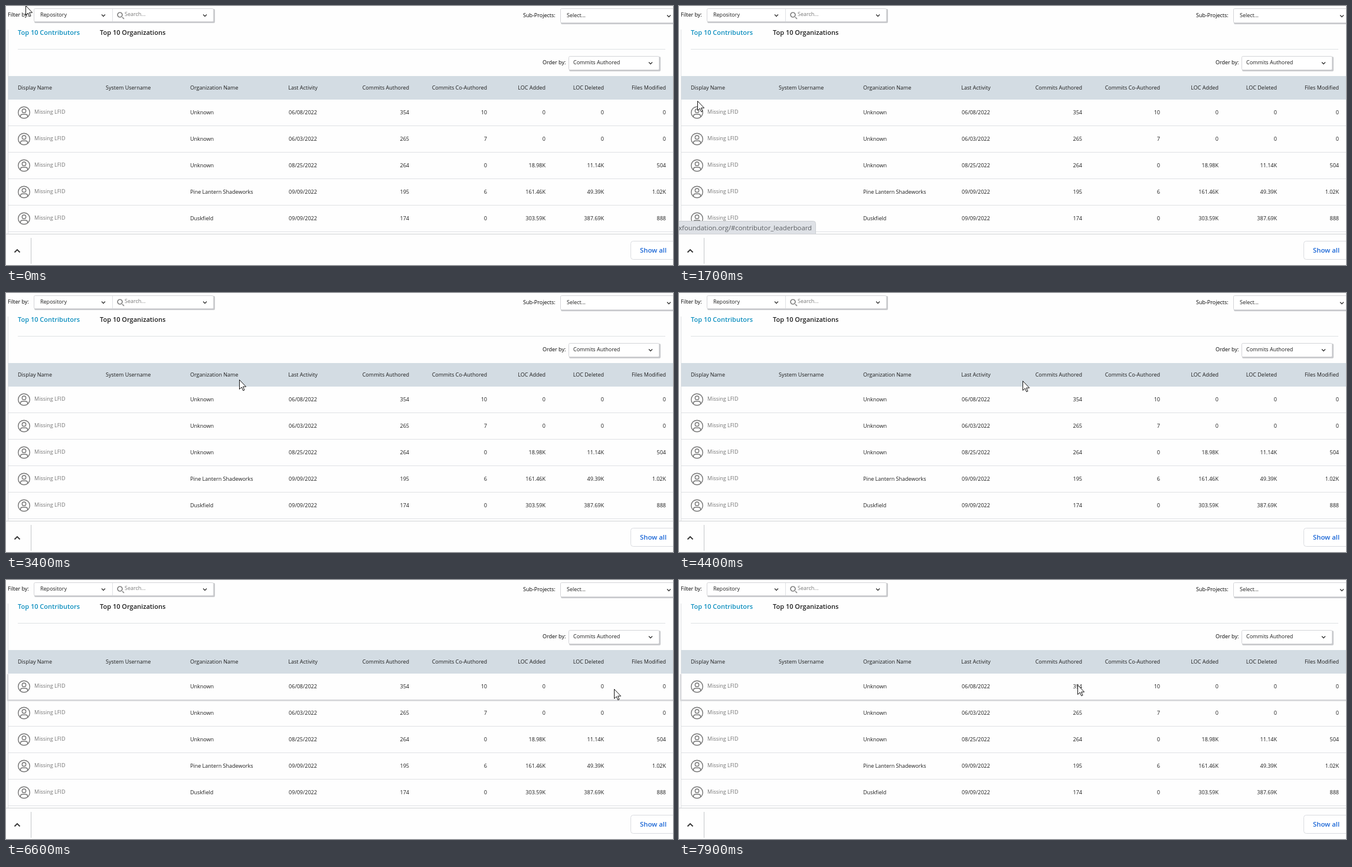
Recreate the animation shown at these times as an HTML page. Size 1130 px wide and 440 px high, loop 8 s.

```html
<!DOCTYPE html>
<html lang="en">
<head>
<meta charset="utf-8">
<title>Contributor leaderboard</title>
<style>
  html, body { margin: 0; width: 100%; height: 100%; overflow: hidden; background: #fefefe; }
  svg { display: block; font: 9px "Open Sans", "Noto Sans", sans-serif; fill: #1c1c1c; }
  text { white-space: pre; }
  .line { fill: none; stroke: #dfe1e4; }
  .chevron { fill: none; stroke: #333; stroke-width: 1.3; }
  .avatar { fill: none; stroke: #757575; stroke-width: 1.4; }
  .tab { font-size: 11px; font-weight: 600; }
  .pointer { fill: #fff; stroke: #111; }
</style>
</head>
<body>
<svg id="stage" width="1130" height="440" viewBox="0 0 1130 440"></svg>
<script>
const stage = document.getElementById('stage');

function add(tag, attrs, parent = stage) {
  const el = document.createElementNS('http://www.w3.org/2000/svg', tag);
  for (const key in attrs) el.setAttribute(key, attrs[key]);
  return parent.appendChild(el);
}

function label(str, x, y, attrs = {}, parent = stage) {
  const el = add('text', { x, y, ...attrs }, parent);
  el.textContent = str;
  return el;
}

const path = (d, cls, attrs = {}, parent = stage) => add('path', { d, class: cls, ...attrs }, parent);
const chevron = (x, y) => path(`M${x - 3} ${y - 1.5}l3 3 3-3`, 'chevron');

function box(x, y, w, h) {
  add('rect', { x: x + 1, y: y + 1, width: w + 1, height: h + 1, rx: 2, fill: '#c9cacd' });
  add('rect', { x: x + .5, y: y + .5, width: w - 1, height: h - 1, rx: 2, fill: '#fff', stroke: '#d3d4d7' });
}

// Filters
label('Filter by:', 3, 18, { fill: '#000' });
box(47, 4, 305, 23);
path('M180.5 5V26', 'line', { stroke: '#d3d4d7' });
label('Repository', 58, 18);
chevron(165, 16);
path('M197 19l3 3M193 11a4 4 0 1 0 .01 0', 'line', { style: 'stroke:#858585;stroke-width:1.7' });
label('Search...', 201, 17, { fill: '#777' });
chevron(337, 16);
label('Sub-Projects:', 876, 19, { fill: '#000' });
box(939, 4, 200, 25);
label('Select...', 950, 19);
chevron(1123, 17);

// Tabs and ordering
label('Top 10 Contributors', 20, 49, { class: 'tab', fill: '#0d8fbf' });
label('Top 10 Organizations', 159, 49, { class: 'tab' });
path('M20 73.5H1117M3.5 40V387', 'line');
label('Order by:', 909, 99, { fill: '#000' });
box(953, 85, 154, 24);
label('Commits Authored', 961, 99);
chevron(1092, 97);

// Table
add('rect', { x: 4, y: 119, width: 1126, height: 40, fill: '#d3dce3' });
const columns = [
  ['Display Name', 20, 'start'], ['System Username', 169, 'start'],
  ['Organization Name', 312, 'start'], ['Last Activity', 503, 'middle'],
  ['Commits Authored', 683, 'end'], ['Commits Co-Authored', 815, 'end'],
  ['LOC Added', 914, 'end'], ['LOC Deleted', 1013, 'end'], ['Files Modified', 1118, 'end']
];
const headers = columns.map(([name, x, anchor]) => label(name, x, 142, { 'text-anchor': anchor }));

const rows = [
  ['Unknown', '06/08/2022', '354', '10', '0', '0', '0'],
  ['Unknown', '06/03/2022', '265', '7', '0', '0', '0'],
  ['Unknown', '08/25/2022', '264', '0', '18.98K', '11.14K', '504'],
  ['Pine Lantern Shadeworks', '09/09/2022', '195', '6', '161.46K', '49.39K', '1.02K'],
  ['Duskfield', '09/09/2022', '174', '0', '303.59K', '387.69K', '888']
];
rows.forEach((cells, i) => {
  const y = 181 + i * 45;
  add('circle', { cx: 30.5, cy: y, r: 9.8, class: 'avatar' });
  add('circle', { cx: 30.5, cy: y - 2.8, r: 3.2, class: 'avatar' });
  path(`M24.5 ${y + 7.5}v-1q0-3.5 3.5-3.5h5q3.5 0 3.5 3.5v1`, 'avatar');
  label('Missing LFID', 48, y + 2, { fill: '#747474' });
  cells.forEach((value, c) => {
    const [, x, anchor] = columns[c + 2];
    label(value, x, y + 3, { 'text-anchor': anchor });
  });
  path(`M4 ${y + 22.5}H1130`, 'line');
});
const hover = path('M3 160V204.5H1130', 'line', { style: 'stroke:#d5d6d9;stroke-width:2.4' });

// Link address bubble
const bubble = add('g', {});
path('M-1 365.5H227.5q4 0 4 4V387.5H-1Z', '', { fill: '#dee1e6', stroke: '#cdd0d4' }, bubble);
label('xfoundation.org/#contributor_leaderboard', 225, 381,
  { 'text-anchor': 'end', 'font-size': 11.3, fill: '#5c6064' }, bubble);

// Bottom bar
path('M0 387.5H1130', 'line', { style: 'stroke:#d0d2d5' });
path('M42.5 394V438', 'line', { style: 'stroke:#c4c6c9' });
path('M14.5 418.5l4.5-4.5 4.5 4.5', 'chevron', { style: 'stroke-width:1.8' });
add('rect', { x: 1058.5, y: 399.5, width: 90, height: 31, rx: 4, fill: '#fff', stroke: '#dadce0' });
label('Show all', 1074, 419, { 'font-size': 11.3, 'font-weight': 600, fill: '#1a66d6' });

// Pointers, each with its hot spot at 0,0
const pointers = {
  arrow: path('M.5 .5V16.5L4.2 13 6.7 18.8 9 17.8 6.5 12.2H11.6Z', 'pointer'),
  beam: path('M-3 -6.5h2.2l.8 .8 .8-.8H3M0-6V6M-3 6.5h2.2l.8-.8 .8 .8H3', 'line', { style: 'stroke:#fff' }),
  hand: path('M-1.5 9V1q0-1.5 1.5-1.5T1.5 1V7q3-1 3 1 3-1 3 1 3-1 3 1v4l-2 5H.5l-5-7q-1-2 1-2Z', 'pointer')
};

// Pointer route: time, x, y
const route = [
  [0, 33, -1], [500, 62, 42], [1000, 80, 46], [1300, 82, 46], [1400, 82, 46],
  [1700, 31, 161], [1900, 42, 170], [2100, 72, 166], [2400, 128, 141], [2500, 128, 141],
  [3400, 395, 147], [3600, 395, 147], [4400, 582, 149], [4500, 610, 148], [4600, 610, 148],
  [5500, 870, 144], [5600, 870, 144], [5900, 950, 122], [6200, 1085, 138], [6300, 1085, 138],
  [6500, 1060, 180], [6700, 1000, 190], [6800, 1000, 190], [7200, 615, 141],
  [7600, 650, 165], [7900, 675, 178], [8000, 675, 178]
];

function locate(t) {
  const next = route.findIndex(stop => stop[0] > t);
  const [t0, x0, y0] = route[next - 1], [t1, x1, y1] = route[next];
  const k = (t - t0) / (t1 - t0);
  return [Math.round(x0 + (x1 - x0) * k), Math.round(y0 + (y1 - y0) * k)];
}

function overText(x, y) {
  return headers.some(el => {
    const b = el.getBBox();
    return x >= b.x && x <= b.x + b.width && y >= b.y && y <= b.y + b.height;
  });
}

function draw(now) {
  const t = Math.floor(now % 8000 / 100) * 100;
  const [x, y] = locate(t);
  const onTab = x >= 20 && x <= 126 && y >= 38 && y <= 54;
  const kind = onTab ? 'hand' : overText(x, y) ? 'beam' : 'arrow';
  for (const name in pointers) {
    pointers[name].setAttribute('visibility', name === kind ? 'visible' : 'hidden');
  }
  pointers[kind].setAttribute('transform', `translate(${x} ${y})`);
  hover.setAttribute('visibility', y > 162 && y < 204 ? 'visible' : 'hidden');
  bubble.setAttribute('opacity', t < 500 ? 0 : Math.max(0, Math.min(1, (2200 - t) / 400)));
  requestAnimationFrame(draw);
}
requestAnimationFrame(draw);
</script>
</body>
</html>
```
